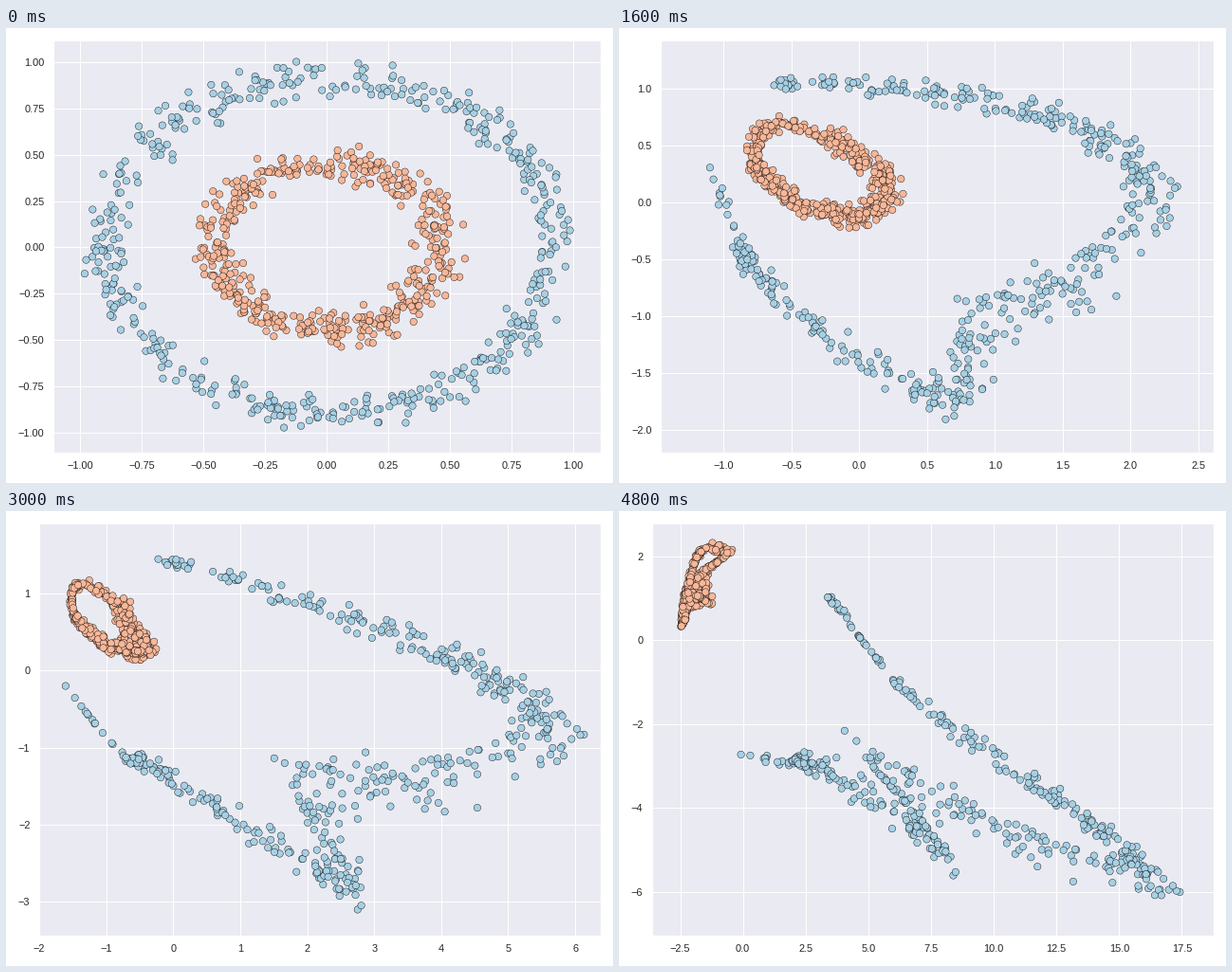
Write a matplotlib script that moves like this. It is 640 px wide and 480 px high and loops after 5800 ms.

```python
import numpy as np
import matplotlib.pyplot as plt
from matplotlib.animation import FuncAnimation

plt.rcParams.update({
    "font.family": "Liberation Sans", "font.size": 12,
    "axes.facecolor": "#EAEAF2", "axes.edgecolor": "white",
    "axes.linewidth": 1.25, "axes.axisbelow": True,
    "axes.grid": True, "grid.color": "white", "grid.linewidth": 1,
    "xtick.labelsize": 11, "ytick.labelsize": 11,
    "xtick.color": ".15", "ytick.color": ".15",
    "xtick.major.size": 6, "ytick.major.size": 6,
    "xtick.bottom": False, "ytick.left": False,
})

DPI, STEP, MOVING, TOTAL = 72, 200, 24, 29
HALF = MOVING * STEP / 2000
rng = np.random.default_rng(7)


def spline(xs, ys, x):
    """Cubic Hermite curve through the rows of ys at xs."""
    slope = np.gradient(ys, xs, axis=0)
    x = np.asarray(x, float)
    i = np.clip(np.searchsorted(xs, x, "right") - 1, 0, len(xs) - 2)
    h = (xs[i + 1] - xs[i])[..., None]
    u = (x - xs[i])[..., None] / h
    return ((2 * u**3 - 3 * u**2 + 1) * ys[i] + (u**3 - 2 * u**2 + u) * h * slope[i]
            + (3 * u**2 - 2 * u**3) * ys[i + 1] + (u**3 - u**2) * h * slope[i + 1])


def ring(count, radius, keys, stretch_mid, stretch_end):
    """Start, halfway and final positions of a noisy circle.

    keys: angle, halfway x, y and final x, y of the circle's centre line.
    stretch: how radial noise grows, linear in the radial direction.
    """
    if keys[-1, 0] - keys[0, 0] == 315:
        turn = np.array([360, 0, 0, 0, 0])
        keys = np.concatenate([keys[-1:] - turn, keys, keys[:2] + turn])
        theta = rng.uniform(0, 360, count)
    else:
        theta = rng.uniform(keys[0, 0], keys[-1, 0], count)
    a = np.radians(theta)
    radial = np.stack([np.cos(a), np.sin(a)], axis=-1)
    noise = np.clip(rng.normal(0, 0.047, (count, 1)), -0.12, 0.1)
    basis = np.column_stack([np.ones(count), radial])
    line = spline(keys[:, 0], keys[:, 1:], theta)
    return np.stack([
        (0.01, 0.01) + (radius + noise) * radial,
        line[:, :2] + noise * (basis @ stretch_mid),
        line[:, 2:] + noise * (basis @ stretch_end),
    ])


inner = ring(
    500, 0.455,
    np.array([
        [0, -.10, .20, -1.60, 1.00],
        [45, -.30, .38, -1.75, 1.50],
        [90, -.60, .70, -.60, 2.10],
        [135, -1.10, .88, -1.70, 2.10],
        [180, -1.15, .58, -2.20, 1.25],
        [225, -.80, .28, -2.40, .40],
        [270, -.45, .10, -2.10, .95],
        [315, -.20, .07, -1.75, 1.05],
    ]),
    [(.35, -.1), (.9, .1), (.2, 1)],
    [(1.5, -.3), (2.5, -.5), (1.5, 1.8)],
)

# The outer circle tears open near 148 degrees
outer = ring(
    500, 0.905,
    np.array([
        [151, -1.46, .22, .05, -2.80],
        [158, -1.15, -.33, 1.50, -2.90],
        [190, -.65, -.85, 2.10, -2.85],
        [230, .50, -1.70, 4.20, -3.45],
        [268, 1.60, -2.20, 7.70, -4.80],
        [302, 1.45, -1.20, 5.80, -3.20],
        [335, 2.55, -.90, 10.8, -4.65],
        [375, 3.65, -.10, 15.7, -5.55],
        [420, 3.00, .60, 13.3, -4.10],
        [450, 2.30, .85, 10.5, -2.95],
        [480, 1.00, 1.15, 6.30, -1.10],
        [506, -.55, 1.38, 3.30, 1.15],
    ]),
    [(2.4, -1.1), (2.7, -.3), (-.3, 2)],
    [(8.5, -4.5), (11.8, -4), (-5.5, 6)],
)

# Camera keys: seconds, then left, right, bottom, top
VIEW = np.array([
    [0.0, -1.108, 1.111, -1.105, 1.117],
    [0.6, -1.117, 1.324, -1.330, 1.216],
    [1.6, -1.463, 2.612, -2.196, 1.425],
    [2.4, -1.800, 4.359, -2.850, 1.629],
    [3.0, -2.001, 6.381, -3.436, 1.915],
    [4.0, -2.900, 12.28, -5.063, 2.246],
    [4.8, -3.620, 18.77, -7.040, 2.790],
])

order = rng.permutation(inner.shape[1] + outer.shape[1])
start, mid, end = np.concatenate([inner, outer], axis=1)[:, order]
tints = plt.get_cmap("RdBu")([1 / 3, 2 / 3])
colors = tints[(order >= inner.shape[1]).astype(int)]


def flow(t):
    """Accelerating drift that passes mid at half time and stops at end."""
    power = np.array([2, 1.2])
    s = t / HALF
    late = max(s - 1, 0) ** np.array([2, 1.5])
    drift = mid - start
    return start + drift * s**power + (end - start - drift * 2**power) * late


fig, ax = plt.subplots(figsize=(640 / DPI, 480 / DPI), dpi=DPI)
dots = ax.scatter(*start.T, s=55, c=colors, edgecolors="black", linewidths=0.4)


def update(i):
    t = min(i, MOVING) * STEP / 1000
    dots.set_offsets(flow(t))
    left, right, bottom, top = spline(VIEW[:, 0], VIEW[:, 1:], t)
    ax.set(xlim=(left, right), ylim=(bottom, top))
    fig.subplots_adjust(left=.07, right=.98, bottom=.07, top=.97)
    fig.tight_layout()
    return dots,


anim = FuncAnimation(fig, update, frames=TOTAL, interval=STEP,
                     repeat=True, repeat_delay=0, blit=False)
plt.show()
```
